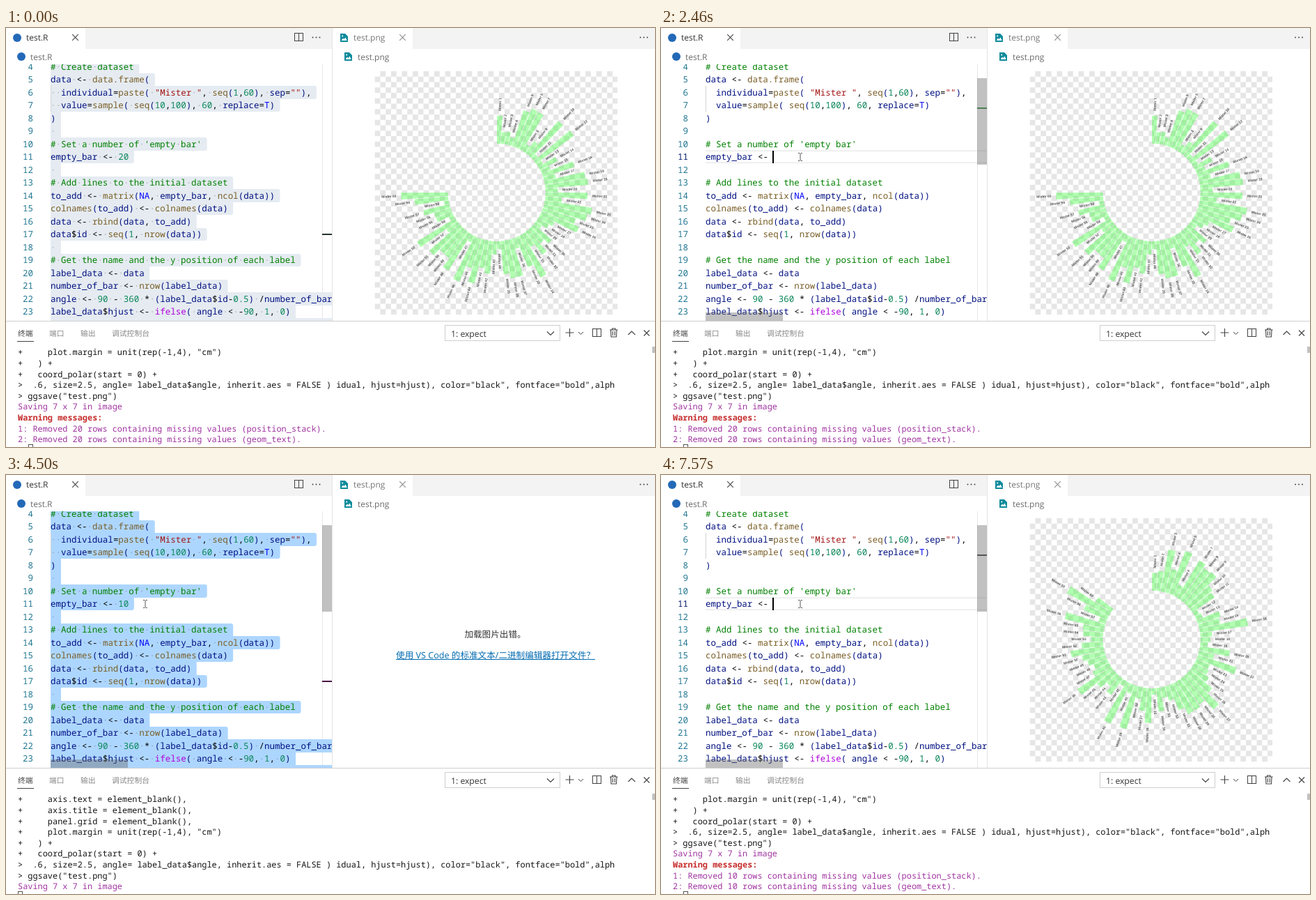
Animation, 932 px wide and 601 px high, one loop 8000 ms. Source, as an HTML page with a canvas:

```html
<!DOCTYPE html>
<html lang="zh-CN">
<head>
<meta charset="utf-8">
<title>Circular barplot</title>
<style>
html, body { margin: 0; width: 100%; height: 100%; overflow: hidden; background: #fff; }
canvas { display: block; width: 932px; height: 601px; }
</style>
</head>
<body>
<canvas id="stage" width="932" height="601"></canvas>
<script>
const ctx = document.getElementById('stage').getContext('2d');
ctx.textRendering = 'geometricPrecision';

const LOOP = 8000;
const UI = '"Open Sans", "Noto Sans CJK SC", "Noto Sans CJK JP", sans-serif';
const MONO = '"Noto Sans Mono", "DejaVu Sans Mono", monospace';
const CODE_X = 64, CODE_W = 7.49, CODE_H = 18.5;
const TERM_X = 17, TERM_W = 7.15, TERM_H = 15.62;

const code = num => [
  "# Create dataset",
  "data <- data.frame(",
  '  individual=paste( "Mister ", seq(1,60), sep=""),',
  "  value=sample( seq(10,100), 60, replace=T)",
  ")",
  " ",
  "# Set a number of 'empty bar'",
  "empty_bar <- " + num,
  " ",
  "# Add lines to the initial dataset",
  "to_add <- matrix(NA, empty_bar, ncol(data))",
  "colnames(to_add) <- colnames(data)",
  "data <- rbind(data, to_add)",
  "data$id <- seq(1, nrow(data))",
  " ",
  "# Get the name and the y position of each label",
  "label_data <- data",
  "number_of_bar <- nrow(label_data)",
  "angle <- 90 - 360 * (label_data$id-0.5) /number_of_bar",
  "label_data$hjust <- ifelse( angle < -90, 1, 0)"
];

const plotTail = [
  "+     axis.text = element_blank(),",
  "+     axis.title = element_blank(),",
  "+     panel.grid = element_blank(),",
  '+     plot.margin = unit(rep(-1,4), "cm")',
  "+   ) +",
  "+   coord_polar(start = 0) +",
  '>  .6, size=2.5, angle= label_data$angle, inherit.aes = FALSE ) idual, hjust=hjust), color="black", fontface="bold",alph',
  '> ggsave("test.png")',
  "Saving 7 x 7 in image"
];
const warnings = n => [
  "Warning messages:",
  `1: Removed ${n} rows containing missing values (position_stack).`,
  `2: Removed ${n} rows containing missing values (geom_text).`
];
const echo = code("10").map((s, i) => (i > 1 && i < 5 ? "+ " : "> ") + s);
const log = [...plotTail, ...warnings(20), ...echo, ...plotTail, ...warnings(10)];

const valuesA = [57, 24, 26, 17, 77, 86, 85, 16, 30, 93, 11, 96, 12, 40, 20, 68, 25, 84, 88, 25,
  86, 34, 98, 91, 71, 83, 33, 26, 15, 49, 37, 58, 32, 96, 66, 22, 78, 78, 68, 16,
  27, 67, 57, 92, 63, 98, 15, 88, 66, 65, 82, 28, 92, 11, 35, 35, 55, 10, 69, 96];
const valuesB = [36, 41, 87, 50, 94, 25, 89, 81, 84, 60, 55, 11, 14, 49, 44, 99, 24, 20, 15, 62,
  32, 83, 30, 33, 41, 59, 91, 65, 70, 70, 55, 30, 22, 48, 13, 71, 47, 24, 91, 19,
  92, 12, 41, 28, 44, 83, 38, 30, 39, 47, 68, 44, 24, 41, 43, 83, 15, 52, 98, 39];

function rect(x, y, w, h, color) {
  ctx.fillStyle = color;
  ctx.fillRect(x, y, w, h);
}
function text(s, x, y, color, font, align = 'left') {
  ctx.font = font;
  ctx.fillStyle = color;
  ctx.textAlign = align;
  ctx.fillText(s, x, y);
}
function lines(color, width, ...paths) {
  ctx.strokeStyle = color;
  ctx.lineWidth = width;
  ctx.beginPath();
  for (const p of paths)
    for (let i = 0; i < p.length; i += 2)
      i ? ctx.lineTo(p[i], p[i + 1]) : ctx.moveTo(p[i], p[i + 1]);
  ctx.stroke();
}
function dot(x, y, r, color) {
  ctx.fillStyle = color;
  ctx.beginPath();
  ctx.arc(x, y, r, 0, 7);
  ctx.fill();
}
const clamp = v => Math.max(0, Math.min(1, v));
const cross = (x, y, r, color) =>
  lines(color, 1.1, [x - r, y - r, x + r, y + r], [x + r, y - r, x - r, y + r]);
const dots = (x, y) => [-5, 0, 5].forEach(d => dot(x + d, y, 0.95, '#424242'));
function splitIcon(x, y) {
  ctx.strokeStyle = '#424242';
  ctx.lineWidth = 1;
  ctx.strokeRect(x + .5, y + .5, 12, 11);
  lines('#424242', 1, [x + 6.5, y, x + 6.5, y + 12]);
}
function imageIcon(x, y) {
  ctx.fillStyle = '#0d8b9b';
  ctx.beginPath();
  ctx.moveTo(x, y); ctx.lineTo(x + 7, y); ctx.lineTo(x + 11, y + 4);
  ctx.lineTo(x + 11, y + 12); ctx.lineTo(x, y + 12);
  ctx.fill();
  ctx.fillStyle = '#fff';
  ctx.beginPath();
  ctx.moveTo(x + 1.5, y + 10); ctx.lineTo(x + 4, y + 6.5); ctx.lineTo(x + 5.5, y + 8);
  ctx.lineTo(x + 7.5, y + 5.5); ctx.lineTo(x + 9.7, y + 10);
  ctx.fill();
  dot(x + 3.2, y + 3.5, 1.1, '#fff');
}

function drawTabs() {
  rect(114, 0, 354, 30, '#f3f3f3');
  rect(584, 0, 348, 30, '#f3f3f3');
  const f = '12px ' + UI;
  dot(16, 14, 6, '#2369b8');
  text('test.R', 29, 18, '#333', f);
  cross(99.5, 13.5, 4.3, '#424242');
  splitIcon(414, 7);
  dots(445.5, 13.5);
  dot(22, 41, 6, '#2369b8');
  text('test.R', 35, 46, '#6b6b6b', f);

  imageIcon(480, 8);
  text('test.png', 499, 18, '#777', f);
  cross(569.5, 13.5, 4.3, '#8c8c8c');
  dots(916, 13.5);
  imageIcon(486, 35);
  text('test.png', 505, 46, '#6b6b6b', f);
}

const TOKEN = /(#.*)|("[^"]*")|(ifelse)|([A-Za-z][\w.]*(?=\())|\b(NA|T)\b|([A-Za-z][\w.]*|[()])|(\d[\d.]*)|(\s+)|(.)/g;
const COLORS = ['#008000', '#a31515', '#af00db', '#795e26', '#0000ff', '#001080', '#098658', '#000', '#000'];
const lineTop = n => 64.75 + (n - 5) * CODE_H;

function drawSelection(src, color) {
  const w = src.map(s => Math.min(420, (s.length + 1) * CODE_W)).concat(420);
  ctx.fillStyle = color;
  w.forEach((wide, i) => {
    const y = Math.round(lineTop(i + 4)), h = Math.round(lineTop(i + 5)) - y;
    const tr = wide > (w[i - 1] ?? 999) ? 3 : 0, br = wide > (w[i + 1] ?? 999) ? 3 : 0;
    ctx.beginPath();
    ctx.roundRect(CODE_X, y, wide, h, [0, tr, br, 0]);
    ctx.fill();
  });
}

function drawEditor(s) {
  const src = code(s.num), font = CODE_W / 0.6 + 'px ' + MONO;
  ctx.save();
  ctx.beginPath();
  ctx.rect(0, 52, 468, 368);
  ctx.clip();
  rect(454, 52, 1, 368, '#e6e6e6');
  if (s.sel) drawSelection(src, s.sel);
  else {
    rect(CODE_X, 175.5, 404, 1.5, '#eaeaea');
    rect(CODE_X, 192.5, 404, 1.5, '#eaeaea');
  }
  if (s.mark) {
    const hi = 'rgba(87,87,87,.25)';
    rect(CODE_X + 13 * CODE_W, 176, 2 * CODE_W, 18, hi);
    if (s.num === '10') rect(CODE_X + 20 * CODE_W, 102, 2 * CODE_W, 18, hi);
  }
  rect(64, Math.round(lineTop(6)), 1, 37, '#d3d3d3');

  src.forEach((line, i) => {
    const n = i + 4, y = lineTop(n) + 13.4;
    text(n, 39, y, n === 11 && !s.sel ? '#0b216f' : '#237893', font, 'right');
    for (const m of line.matchAll(TOKEN)) {
      const kind = m.slice(1).findIndex(g => g !== undefined);
      text(m[0], CODE_X + m.index * CODE_W, y, COLORS[kind], font);
    }
    if (s.sel)
      [...line].forEach((c, k) => {
        if (c === ' ') dot(CODE_X + (k + .5) * CODE_W, y - 4, .8, 'rgba(51,51,51,.32)');
      });
  });

  // overview ruler and scrollbars
  if (s.mark)
    (s.num === '10' ? [89, 114, 285] : [114]).forEach(y => rect(459, y, 5, 4, '#a0a0a0'));
  if (s.bars) {
    const c = `rgba(100,100,100,${.4 * s.bars})`;
    rect(454, 72, 14, 124, c);
    rect(64, 408, 111, 12, c);
  }
  rect(454, s.sel ? 295 : 114, 14, 2, s.ruler);
  if (s.caret) {
    const x = CODE_X + (13 + s.num.length) * CODE_W;
    rect(Math.round(x - .9), 176, 2, 18, `rgba(0,0,0,${s.caret})`);
  }
  ctx.restore();
}

function drawPlot(values, total) {
  const left = 529.7, top = 62, size = 349, cell = 7.757;
  ctx.save();
  ctx.beginPath();
  ctx.rect(529, top, size, size);
  ctx.clip();
  for (let r = 0; r < 45; r++)
    for (let c = (r + 1) % 2; c < 45; c += 2)
      rect(left + c * cell, top + r * cell, cell, cell, '#e6e6e6');

  const radius = v => (v + 100) / 220 * 154.2;
  const step = 2 * Math.PI / total;
  ctx.translate(704.7, 235.8);
  ctx.textBaseline = 'middle';
  values.forEach((v, i) => {
    const a = (i + .5) * step - Math.PI / 2, half = step * .45;
    ctx.fillStyle = 'rgba(0,255,0,.3)';
    ctx.beginPath();
    ctx.arc(0, 0, radius(v), a - half, a + half);
    ctx.arc(0, 0, radius(0), a + half, a - half, true);
    ctx.fill();
    const flip = a > Math.PI / 2;
    ctx.save();
    ctx.rotate(a + (flip ? Math.PI : 0));
    text('Mister ' + (i + 1), (flip ? -1 : 1) * radius(v + 10), 0, 'rgba(0,0,0,.65)',
      'bold 4.92px "Liberation Sans", Arial, sans-serif', flip ? 'right' : 'left');
    ctx.restore();
  });
  ctx.restore();
}

function drawError() {
  const f = '12.6px ' + UI, link = '使用 VS Code 的标准文本/二进制编辑器打开文件？';
  text('加载图片出错。', 702.5, 233, '#333', f, 'center');
  text(link, 703, 262.5, '#006ab1', f, 'center');
  const w = ctx.measureText(link).width;
  rect(703 - w / 2, 264, w, 1, '#006ab1');
}

function drawPanel(end) {
  rect(0, 420, 932, 1, '#cfcfcf');
  const f = '10.8px ' + UI, dark = '#424242';
  [['终端', 17], ['端口', 62], ['输出', 107], ['调试控制台', 152]].forEach(([s, x], i) =>
    text(s, x, 442, i ? '#888' : dark, f));
  rect(16, 449, 24, 1, dark);
  ctx.strokeStyle = '#cecece';
  ctx.lineWidth = 1;
  ctx.strokeRect(630.5, 426.5, 165, 22);
  text('1: expect', 639, 443, '#333', '12.2px ' + UI);
  lines(dark, 1.1, [777, 435.5, 782, 440.5, 787, 435.5]);
  lines(dark, 1.1, [803.5, 437, 815.5, 437], [809.5, 431, 809.5, 443]);
  lines(dark, 1, [822, 436, 825.5, 439.5, 829, 436]);
  splitIcon(842, 431);
  lines(dark, 1.1, [867, 433, 878.5, 433], [870.5, 433, 870.5, 431, 875, 431, 875, 433],
    [868.5, 433, 869, 443, 876.5, 443, 877, 433], [871.3, 435, 871.3, 441], [874.3, 435, 874.3, 441]);
  lines(dark, 1.1, [893.5, 440, 898.5, 435, 903.5, 440]);
  cross(920, 437.5, 4, dark);

  const size = TERM_W / 0.6 + 'px ' + MONO;
  log.slice(end - 9, end).forEach((s, i) => {
    const bold = s.startsWith('Warning');
    const color = bold ? '#c72e2e' : /^(Saving|\d:)/.test(s) ? '#a034a0' : '#151515';
    text(s, TERM_X, 469.3 + i * TERM_H, color, (bold ? 'bold ' : '') + size);
  });
  const idle = /^\d:/.test(log[end - 1]);
  ctx.strokeStyle = '#555';
  ctx.lineWidth = 1;
  ctx.strokeRect(idle ? 32.5 : 17.5, 597.5, 6, 12);
  rect(928, 457, 4, 9, '#c1c1c1');
}

function drawPointer(x, y) {
  lines('#555', 1, [x - 3, y - 5.5, x - 1, y - 5.5, x, y - 4.5, x + 1, y - 5.5, x + 3, y - 5.5],
    [x, y - 4.5, x, y + 4.5],
    [x - 3, y + 5.5, x - 1, y + 5.5, x, y + 4.5, x + 1, y + 5.5, x + 3, y + 5.5]);
}

// picks the value of the latest [time, value] pair that has started
const at = (t, pairs) => pairs.reduce((v, [start, next]) => t >= start ? next : v, null);

function caretAt(t) {
  if (t < 920) return 0;
  if (t < 1910) return 1 - clamp((t - 1400) / 70);
  if (t < 3000) return clamp((t - 1910) / 160);
  if (t < 3300) return 1 - clamp((t - 3000) / 160);
  if (t < 3790) return 1;
  if (t < 6380) return 0;
  if (t < 7400) return 1 - clamp((t - 7000) / 170);
  return 1;
}

function pointerAt(t) {
  if (t < 70) return null;
  const p = clamp((t - 70) / 770), e = p * p * (3 - 2 * p);
  const drift = clamp((t - 1390) / 80) * 2;
  return [936 - 738 * e + drift, 603 - 418 * e];
}

function draw(t) {
  ctx.textBaseline = 'alphabetic';
  rect(0, 0, 932, 601, '#fff');
  drawTabs();

  const num = at(t, [[0, '20'], [2300, '2'], [2460, ''], [3300, '1'], [3400, '10'], [7490, '1'], [7570, '']]);
  drawEditor({
    num,
    sel: at(t, [[0, '#e5ebf1'], [920, ''], [3790, '#add6ff'], [6380, '']]),
    mark: at(t, [[0, false], [1620, true], [2220, false], [6700, true], [7400, false]]),
    ruler: at(t, [[0, '#25332f'], [920, '#4d8055'], [3790, '#4a1545'], [6380, '#555']]),
    bars: clamp((t - 560) / 100),
    caret: caretAt(t)
  });
  rect(468, 0, 1, 420, '#e4e4e4');

  if (t < 4420) drawPlot(valuesA, 80);
  else if (t < 5520) drawError();
  else drawPlot(valuesB, 70);

  // the script is echoed in six jumps
  const first = 12, ran = log.length - 3;
  const jump = t < 4080 ? 0 : Math.min(6, 1 + Math.floor((t - 4080) / 84));
  drawPanel(t >= 5280 ? log.length : first + Math.round((ran - first) * jump / 6));

  const p = pointerAt(t);
  if (p) drawPointer(...p);
}

function tick() {
  draw(performance.now() % LOOP);
  requestAnimationFrame(tick);
}
tick();
</script>
</body>
</html>
```
